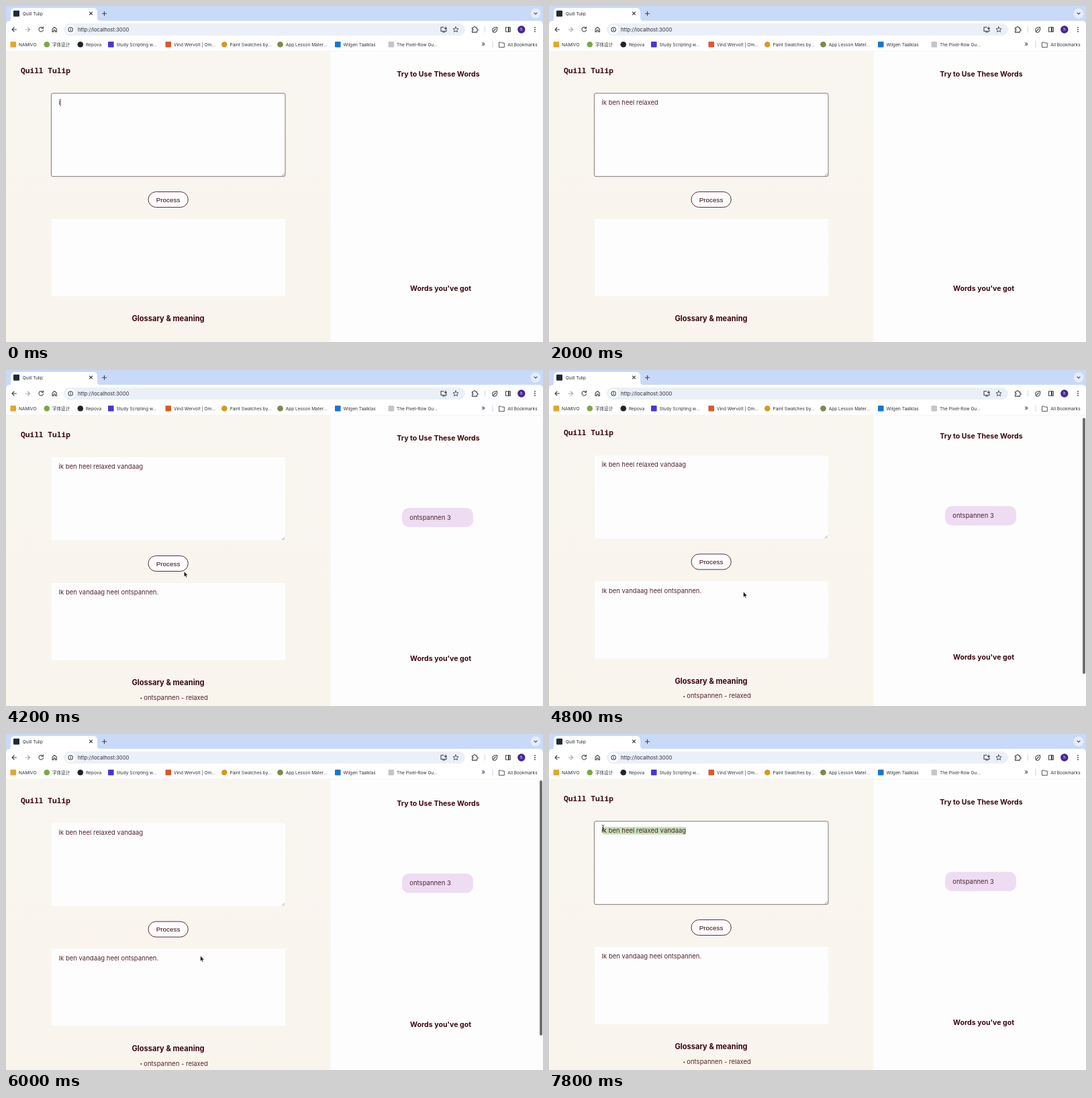
Write an HTML page that moves like this. It is 800 px wide and 500 px high and loops after 8 s.

```html
<!DOCTYPE html>
<html lang="en">
<head>
<meta charset="utf-8">
<title>Quill Tulip</title>
<style>
html, body { margin: 0; width: 100%; height: 100%; overflow: hidden; background: #fdfdfd; }
svg { display: block; width: 800px; height: 500px; font-family: Inter, "Noto Sans CJK SC", sans-serif; }
text { white-space: pre; }
.chrome { font-size: 6.55px; fill: #2d3035; }
.url { font-size: 7.7px; }
.icon { fill: none; stroke: #3f4349; stroke-width: 1.1; stroke-linecap: round; stroke-linejoin: round; }
.page { fill: #512530; font-size: 9.5px; }
.title { font: bold 11.2px "Noto Sans Mono", monospace; fill: #3d0710; }
.head { font-weight: 700; font-size: 10.6px; fill: #3d0710; text-anchor: middle; }
.process { font: 9.9px "Liberation Sans", Arial, sans-serif; text-anchor: middle; }
</style>
</head>
<body>
<svg viewBox="0 0 800 500">
  <defs>
    <clipPath id="viewport"><rect y="67.5" width="800" height="433"/></clipPath>
    <linearGradient id="cream" x2="0" y2="1">
      <stop stop-color="#f9f6f0"/><stop offset="1" stop-color="#f9f5ed"/>
    </linearGradient>
  </defs>
  <rect width="800" height="500" fill="#fdfdfd"/>
  <g clip-path="url(#viewport)">
    <rect y="67" width="483.5" height="433" fill="url(#cream)"/>
    <g id="content" class="page">
      <text class="title" x="22" y="100">Quill Tulip</text>
      <rect x="68" y="130" width="348" height="123.5" fill="#fdfdfd"/>
      <rect id="focus" x="67.4" y="129.9" width="348.6" height="123.8" rx="2.5" fill="none" stroke="#6f6166" stroke-width=".85"/>
      <path d="M411 253l4-4M413.5 253l1.5-1.5" stroke="#777" stroke-width=".7"/>
      <rect id="selection" y="138.3" height="11.2" fill="#c6e0b6"/>
      <text id="entry" x="78.5" y="147"></text>
      <path id="caret" d="M0 138.5v10.5" stroke="#45151f" stroke-width=".8"/>
      <rect id="button" x="212" y="276.5" width="59.3" height="23" rx="11.5" stroke-width=".9"/>
      <text id="label" class="process" x="241.5" y="291.5">Process</text>
      <rect x="68" y="317" width="348" height="115" fill="#fdfdfd"/>
      <text class="head" x="241.5" y="469.2" style="font-size:11.1px">Glossary &amp; meaning</text>
      <text class="head" x="644" y="104.8">Try to Use These Words</text>
      <text class="head" id="collected" x="647.6">Words you've got</text>
      <g id="result">
        <text x="78.5" y="334.2">Ik ben vandaag heel ontspannen.</text>
        <circle cx="201.3" cy="488.5" r="1"/>
        <text x="205.3" y="491">ontspannen - relaxed</text>
        <rect x="590" y="205.2" width="106" height="28.6" rx="10" fill="#eedcf3"/>
        <text x="601.3" y="222.5">ontspannen 3</text>
      </g>
    </g>
    <rect id="thumb" x="795" width="4" rx="2" fill="#6f6f70"/>
  </g>

  <g id="browser" class="chrome">
    <rect width="800" height="30" fill="#c9d9f8"/>
    <path d="M0 28q0-6 6-6 1 0 1-4V9q0-6 6-6H130q6 0 6 6v9q0 4 4 4H794q6 0 6 6V67H0z" fill="#fff"/>
    <path d="M0 67.3H800" stroke="#e9ebef" stroke-width=".6"/>
    <rect x="11" y="6.7" width="9" height="9" rx="1" fill="#1f2b36"/>
    <text x="24.7" y="13.6">Quill Tulip</text>
    <circle cx="789" cy="11" r="7.5" fill="#e4ecfc"/>
    <rect x="86" y="26" width="598" height="18" rx="9" fill="#ebeff8"/>
    <circle cx="96.2" cy="35" r="7" fill="#fff"/>
    <text class="url" x="107" y="37.8">http://localhost:3000</text>
    <g class="icon">
      <path d="M124.5 9l4 4m0-4l-4 4M146.5 8.3v6m-3-3h6M787 10.2l2 2 2-2"/>
      <path d="M15.5 35h-6.5m3-3l-3 3 3 3"/>
      <path d="M29 35h6.5m-3-3l3 3-3 3" stroke="#a5a8ad"/>
      <path d="M55 33a3.3 3.3 0 1 0 .5 2.6M55.5 31v2.3h-2.3"/>
      <path d="M69 38.5v-4.3l3.2-2.7 3.2 2.7v4.3h-2v-2.7h-2.4v2.7z"/>
      <circle cx="96.2" cy="35" r="3.3"/><path d="M96.2 34.8v1.7m0-3.2v.1"/>
      <path d="M652 31.5h-4v6h8v-2M650.5 39h3.5M655 31v3.5m-1.5-1.5l1.5 1.5 1.5-1.5"/>
      <path d="M670 31l1.2 2.6 2.8.3-2.1 1.9.6 2.8-2.5-1.4-2.5 1.4.6-2.8-2.1-1.9 2.8-.3z" stroke-width=".9"/>
      <path d="M694.5 32.3h2.3q.2-1.8 1.3-1.8t1.3 1.8h2.1v2.2q1.8.2 1.8 1.3t-1.8 1.3v2h-7v-2.3q1.5-.2 1.5-1.2t-1.5-1.2z"/>
      <path d="M713.3 31v8M725 52.5v9" stroke="#ccd7f0"/>
      <path d="M725 37q-2-5 6.5-5.5.8 7.8-4 7.7-2.5-.3-2.5-2.2zm1.5 0l3-3"/>
      <rect x="744.5" y="31.7" width="7" height="6.6"/>
      <path d="M749 32v6" stroke-width="2"/>
      <path d="M734.5 61v-7h2.8l1 1h4v6z" stroke-width=".9"/>
    </g>
    <circle cx="767.8" cy="35" r="5.7" fill="#46278f"/>
    <text x="767.8" y="37" text-anchor="middle" fill="#fff" style="font-size:5.6px">h</text>
    <g fill="#3f4349"><circle cx="788" cy="32" r=".9"/><circle cx="788" cy="35" r=".9"/><circle cx="788" cy="38" r=".9"/></g>
    <text x="708.3" y="60" style="font-size:10px">»</text>
    <text x="747.3" y="59.6">All Bookmarks</text>
  </g>

  <path id="arrow" d="M0 0V8.2l1.9-1.7 1.3 2.9 1.3-.6-1.2-2.8H5.9z" fill="#111" stroke="#fff" stroke-width=".6"/>
  <path id="beam" d="M-2-4.5q2 0 2 1.2V3.5q0 1.2-2 1.2M2-4.5q-2 0-2 1.2V3.5q0 1.2 2 1.2M-1 1H1" fill="none" stroke="#222" stroke-width=".7"/>
</svg>
<script>
const LOOP = 8000, STEP = 200;
const SENTENCE = "ik ben heel relaxed vandaag";
const $ = id => document.getElementById(id);
const set = (id, attrs) => {
  for (const name in attrs) $(id).setAttribute(name, attrs[name]);
};
const show = (id, visible) => set(id, { visibility: visible ? "visible" : "hidden" });

// Label, text x, icon colour, round icon
const bookmarks = [
  ["NAMIVO", 19, "#e4a52d"],
  ["字体设计", 69, "#7ba843", true],
  ["Repova", 119, "#20242a", true],
  ["Study Scripting w...", 164.5, "#4a35d4"],
  ["Vind Wervolt | Om...", 250, "#d95b2b"],
  ["Paint Swatches by...", 333.5, "#d29b24", true],
  ["App Lesson Mater...", 416.7, "#7c8b45", true],
  ["Wilgen Taalklas", 502.5, "#1976cf"],
  ["The Pixel-Row Gu...", 582, "#c3c6c9"]
];
$("browser").insertAdjacentHTML("beforeend", bookmarks.map(([label, x, color, round]) =>
  `<rect x="${x - 12.5}" y="53" width="8.6" height="8.6" rx="${round ? 4.3 : 1}" fill="${color}"/>
   <text x="${x}" y="59.6">${label}</text>`).join(""));

// Eased interpolation through [time, value] points
function track(time, points) {
  const next = points.findIndex(p => p[0] > time);
  if (next < 0) return points.at(-1)[1];
  if (next === 0) return points[0][1];
  const [t0, a] = points[next - 1], [t1, b] = points[next];
  const u = (time - t0) / (t1 - t0);
  return a + (b - a) * u * u * (3 - 2 * u);
}

const mouseX = t => track(t, [[3000, 290], [3400, 256.7], [4000, 256.7], [4600, 289.5],
  [6300, 289.5], [6800, 204], [7000, 168], [7400, 80.5]]);
const mouseY = t => track(t, [[3000, 322], [3400, 289], [4000, 289], [4600, 330],
  [6300, 330], [6700, 144], [7000, 143], [7400, 140]]);
const scrollAt = t => track(t, [[4600, 0], [4800, 2.6], [5200, 45], [5400, 45],
  [5800, 4], [6000, -2.6], [6400, 0]]);

function typedCount(t) {
  if (t < 2000) return Math.min(19, 1 + Math.floor(t * 18 / 1600));
  return Math.min(SENTENCE.length, 19 + Math.floor(Math.max(0, t - 2000) / 100));
}

function draw(t) {
  const entry = $("entry");
  const count = typedCount(t);
  const scroll = scrollAt(t);
  const done = t >= 4200;
  const busy = t >= 3200 && !done;
  const x = mouseX(t), y = mouseY(t);
  const overText = t > 6300 && y < 254;

  set("content", { transform: `translate(0 ${-scroll})` });
  entry.textContent = SENTENCE.slice(0, count);
  const textEnd = 78.5 + entry.getComputedTextLength();
  show("focus", t < 3300 || t >= 6800);
  show("caret", t < 1800 || (t > 2000 && t < 3200));
  set("caret", { transform: `translate(${textEnd + .3} 0)` });

  // The highlight trails the pointer and snaps to whole letters
  let from = textEnd;
  if (t >= 6800) {
    const reach = mouseX(t - 100);
    for (let i = count - 1; i >= 0; i--) {
      const box = entry.getExtentOfChar(i);
      if (box.x + box.width / 2 < reach) break;
      from = box.x;
    }
  }
  set("selection", { x: from, width: textEnd - from });

  set("button", { fill: busy ? "#b5a1a1" : "#fdfdfd", stroke: busy ? "none" : "#4a1823" });
  set("label", { fill: busy ? "#fbf8f8" : "#330810" });
  show("result", done);
  set("collected", { y: done ? 433.3 : 424.1 });
  show("thumb", t >= 4400 && t < 6600);
  set("thumb", { y: 69 + Math.max(0, scroll) * .88, height: 381 + Math.min(0, scroll) * .5 });

  show("arrow", t >= 3000 && !overText);
  show("beam", overText);
  for (const id of ["arrow", "beam"]) set(id, { transform: `translate(${x} ${y})` });
}

function frame() {
  draw(Math.floor(performance.now() % LOOP / STEP) * STEP);
  requestAnimationFrame(frame);
}
frame();
</script>
</body>
</html>
```
